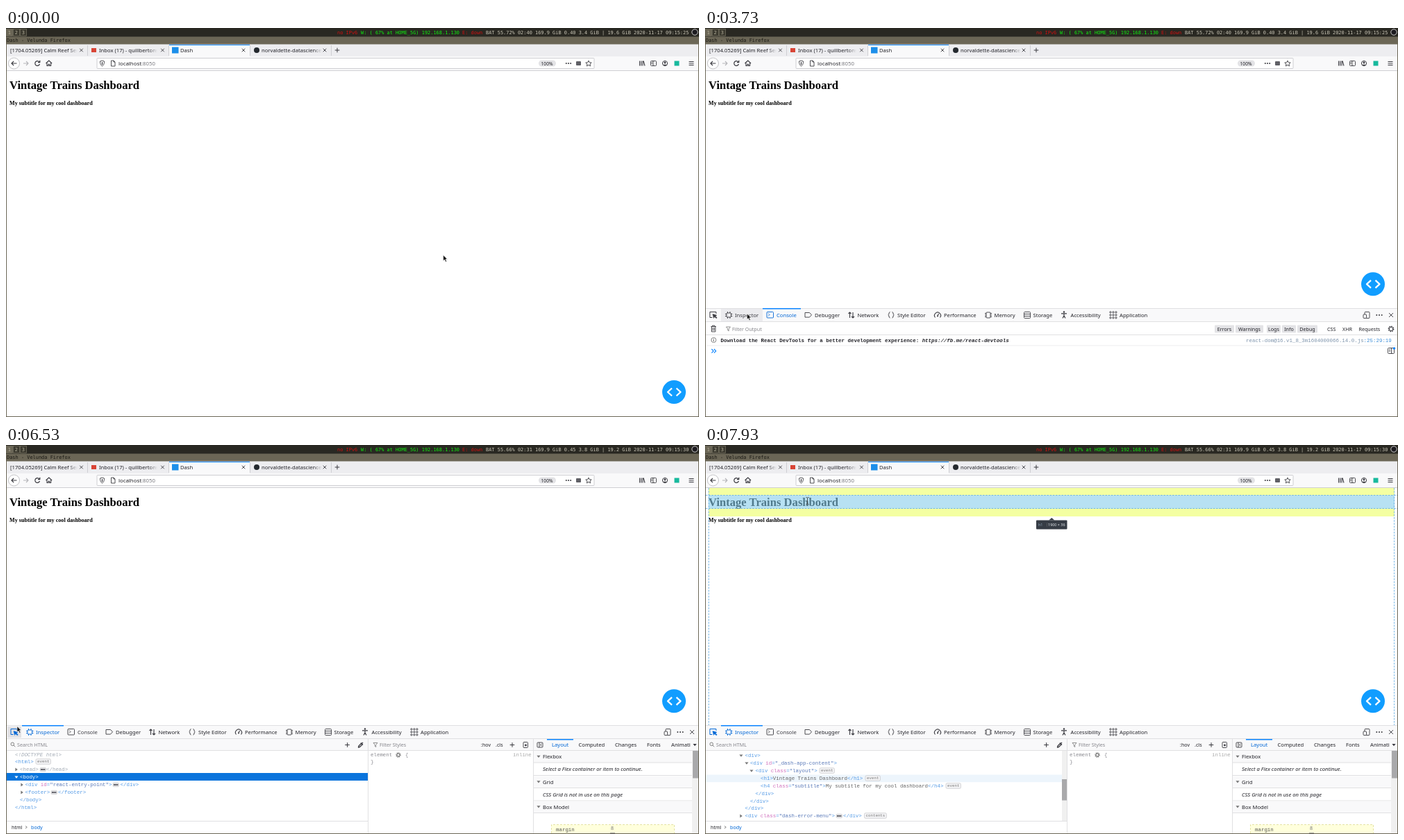
Write an HTML page that moves like this. It is 998 px wide and 561 px high and loops after 8 s.

```html
<!DOCTYPE html>
<html lang="en">
<head>
<meta charset="utf-8">
<title>Dashboard inspection</title>
<style>
html, body { margin: 0; width: 100%; height: 100%; overflow: hidden; background: #fff; }
svg { display: block; }
text { font: 7.65px "Noto Sans", sans-serif; fill: #222228; white-space: pre; }
text.bar { font: 6.95px "DejaVu Sans Mono", monospace; }
text.small { font-size: 7.15px; }
text.tiny { font-size: 5.4px; }
text.mono { font: 7.45px "Liberation Mono", monospace; }
text.badge { font: 5.8px "Liberation Mono", monospace; fill: #777; }
text.serif { font: bold 16.63px "Liberation Serif", serif; fill: #000; }
text.tag { fill: #559be6; }
text.dim { fill: #a3abb5; }
text.italic { font-style: italic; }
.name { fill: #d070bd; }
.val { fill: #5878b8; }
.txt { fill: #666; }
</style>
</head>
<body>
<svg id="stage" width="998" height="561" viewBox="0 0 998 561"></svg>
<script>
const LOOP = 8000, INK = '#3a3a40', BLUE = '#0a84ff', LINK = '#0067d6', EDGE = '#e0e0e2';
const OPEN = 1870, TOOLS = 2140, INSPECT = 4130, PANEL = 4270, TREE = 4530, PICK = 6130, OVER = 6730, HEAD = 7600;

const esc = s => s.replace(/&/g, '&amp;').replace(/</g, '&lt;').replace(/>/g, '&gt;');
const raw = (x, y, s, cls = '', more = '') => `<text x="${x}" y="${y}" class="${cls}" ${more}>${s}</text>`;
const text = (x, y, s, cls, more) => raw(x, y, esc(s), cls, more);
const color = c => `style="fill:${c}"`;
const rect = (x, y, w, h, fill, more = '') => `<rect x="${x}" y="${y}" width="${w}" height="${h}" fill="${fill}" ${more}/>`;
const path = (d, stroke = INK, w = .9, fill = 'none') =>
  `<path d="${d}" stroke="${stroke}" stroke-width="${w}" fill="${fill}" stroke-linejoin="round"/>`;
const circle = (x, y, r, fill = 'none', stroke = 'none', w = .9) =>
  `<circle cx="${x}" cy="${y}" r="${r}" fill="${fill}" stroke="${stroke}" stroke-width="${w}"/>`;
const box = (x, y, w, h, c = INK, fill = 'none') => rect(x, y, w, h, fill, `rx="1" stroke="${c}" stroke-width=".9"`);
const hline = (x, y, w, c = EDGE) => rect(x, y, w, 1, c);
const vline = (x, y, h, c = EDGE) => rect(x, y, 1, h, c);
const cross = (x, y, r = 2.3) => path(`M${x - r} ${y - r}l${2 * r} ${2 * r}m0 ${-2 * r}l${-2 * r} ${2 * r}`);
const plus = (x, y, r = 3.3) => path(`M${x - r} ${y}h${2 * r}M${x} ${y - r}v${2 * r}`, INK, 1);
const dots = (x, y, gap = 3.2) => [-1, 0, 1].map(i => circle(x + i * gap, y, 1, INK)).join('');
const gear = (x, y, r = 3.2, c = INK) => circle(x, y, r - .9, 'none', c, 1) +
  `<circle cx="${x}" cy="${y}" r="${r}" fill="none" stroke="${c}" stroke-width="1.4" stroke-dasharray="${r * .39}"/>`;
const funnel = (x, y) => path(`M${x - 3} ${y - 3}h6l-2.3 3v3l-1.4-1v-2z`, '#777', .8);
const lens = (x, y) => circle(x - .7, y - .7, 2.3, 'none', '#777') + path(`M${x + 1} ${y + 1}l2.3 2.3`, '#777');
const tri = (x, y, open, c = '#777') =>
  path(open ? `M${x - 2.6} ${y - 1.6}h5.2l-2.6 3.4z` : `M${x - 1.6} ${y - 2.6}v5.2l3.4-2.6z`, 'none', 0, c);

// Desktop bar and browser frame
const workspace = (n, fill) => rect(n * 10 - 9.5, 1.5, 9, 10, fill, 'stroke="#7a7564" stroke-width=".7"') +
  text(n * 10 - 7.2, 9, String(n), 'bar', color('#b5b09c'));

const status = (bat, left, load, mem, free, time) =>
  text(691, 9, `BAT ${bat}% ${left} 169.9 GiB ${load} ${mem} GiB | ${free} GiB 2020-11-17 ${time}`, 'bar', color('#c9c5b6'));

const tab = (x, label, width, icon = '') => icon +
  `<svg x="${x}" y="24" width="${width}" height="17">${text(0, 11, label)}</svg>` +
  rect(x + width - 12, 27, 12, 11, 'url(#fade)');

const frame =
  `<defs><linearGradient id="fade"><stop stop-color="#ededf0" stop-opacity="0"/><stop offset="1" stop-color="#ededf0"/></linearGradient></defs>` +
  rect(0, 0, 998, 561, '#6b6656') + rect(0, 0, 998, 12.5, '#292822') +
  workspace(1, '#6b6656') + workspace(2, '#3b392f') + workspace(3, '#3b392f') +
  text(477, 9, 'no IPv6', 'bar', color('#d01010')) +
  text(511, 9, 'W: ( 67% at HOME_5G) 192.168.1.130', 'bar', color('#10f010')) +
  text(657, 9, 'E: down', 'bar', color('#d01010')) +
  circle(992, 6, 4.2, '#1d1b20', '#ddd') +
  text(1, 20.3, 'Dash - Velunda Firefox', 'bar', color('#191813')) +
  rect(1, 23.5, 996, 18, '#ededf0') + rect(235, 24, 116, 17.5, '#f9f9fa') + rect(235, 24, 116, 1, BLUE) +
  [117, 234, 351, 468].map(x => vline(x, 25, 15, '#cfcfd3')).join('') +
  [108.5, 225.5, 342, 459].map(x => cross(x, 32)).join('') + plus(477, 32) +
  tab(6, '[1704.05269] Calm Reef Sera', 97) +
  tab(134, 'Inbox (17) - quillbertons', 84, rect(123, 29, 7, 6, '#d94436')) +
  rect(239, 27.5, 9.5, 9, '#1c8fea') + text(251, 35, 'Dash') +
  tab(368, 'norvaldette-datascience', 87, circle(361, 32, 4, '#24292e')) +
  rect(1, 41, 996, 20.5, '#f9f9fa') + hline(1, 61, 996, '#cfcfd3') +
  box(131, 43.5, 716, 15, '#c9c9cd', '#fff') +
  circle(11.5, 51, 8, '#fff', '#b4b4b8', .8) +
  path('M15.5 51h-7.5m3.2-3.2l-3.2 3.2 3.2 3.2', INK, 1.2) +
  path('M25 51h7m-3-3l3 3-3 3', '#b5b5b9', 1.1) +
  path('M48 49a3.4 3.4 0 1 0 .5 3M48.8 46.8v2.8h-2.8', INK, 1.2) +
  path('M57.5 51l4.3-4 4.3 4M59 50.5v4h2v-2.2h1.6v2.2h2v-4', INK, 1.1) +
  path('M135.5 48l3-1 3 1c0 4-1 5.5-3 7c-2-1.5-3-3-3-7z') + path('M138.5 49v4', INK, 1.2) +
  path('M151.5 47h3.5l2 2v6h-5.5zM155 47v2h2') +
  raw(162, 54, 'localhost<tspan fill="#77777d">:8050</tspan>', '', 'style="font-size:7.8px"') +
  rect(767, 46.5, 25, 9, '#e3e3e6', 'rx="4.5"') + text(770.5, 53.5, '100%', '', 'style="font-size:6.7px"') +
  dots(810, 51) + rect(821, 48, 7, 6, '#606066', 'rx="1"') +
  path('M839 47l1.2 2.7 3 .3-2.2 2 .6 2.9-2.6-1.5-2.6 1.5.6-2.9-2.2-2 3-.3z') +
  path('M912.5 47.5v7M914.7 47.5v7M917 47.5v7M918 47.5l2 7', INK, 1.1) +
  box(928.5, 47.5, 8, 7) + path('M932 47.5v7M929.5 49.5h1.5m-1.5 2h1.5') +
  circle(949, 51, 3.6, 'none', INK, 1) + circle(949, 50, 1.4, INK) + path('M947 53.3h4', INK, 1.2) +
  rect(962.5, 47.5, 7, 7, '#18b99d') +
  path('M983.5 48.5h7m-7 2.5h7m-7 2.5h7', INK, 1) +
  rect(1, 62, 996, 498, '#fff');

const page = text(5, 88, 'Vintage Trains Dashboard', 'serif') +
  text(5, 110.7, 'My subtitle for my cool dashboard', 'serif', 'style="font-size:8.15px"');

const codeButton = y => circle(962, y, 17, '#119dff') +
  path(`M959 ${y - 5.5}l-6 5.5 6 5.5M965.5 ${y - 5.5}l6 5.5-6 5.5`, '#fff', 2.3);

// Developer tools
const pickIcon = c => path('M16 412v-2.5h-9v8h3.5', c, 1) + path('M11 412.5l1.5 6 1.3-2 2.5 2.3 1-1-2.3-2.3 2-1.2z', c, .5, c);
const inspectIcon = c => box(31, 411, 6.5, 6, c) +
  path('M32.5 411v-2m3.5 2v-2m-3.5 8v2m3.5-2v2M31 412.5h-2m2 3h-2m8.5-3h2m-2 3h2', c);
const consoleIcon = c => box(89, 409.5, 9.5, 8.5, c) + path('M91 411.5l2 2-2 2', c);
const inspectorTab = c => inspectIcon(c) + text(43, 416.5, 'Inspector', '', color(c));
const consoleTab = c => consoleIcon(c) + text(103, 416.5, 'Console', '', color(c));
const tabLine = (x, w) => rect(x, 404, w, 1.5, BLUE);

const toolLabels = { 158: 'Debugger', 219.5: 'Network', 277: 'Style Editor', 344: 'Performance',
  416.5: 'Memory', 472.5: 'Storage', 526.5: 'Accessibility', 597: 'Application' };
const toolbar = rect(1, 404, 996, 19.5, '#f9f9fa') + hline(1, 404, 996) + hline(1, 423, 996) +
  Object.entries(toolLabels).map(([x, s]) => text(x, 416.5, s)).join('') +
  path('M144 410.5h6.5l3 3.3-3 3.3h-6.5z') +
  path('M208.5 418v-8m-2 2l2-2 2 2M213 410v8m-2-2l2 2 2-2', INK, 1.1) +
  path('M266.5 409.5c-2 0-1 4-2.7 4.3c1.7.3.7 4.3 2.7 4.3M269.5 409.5c2 0 1 4 2.7 4.3c-1.7.3-.7 4.3-2.7 4.3', INK, 1) +
  path('M331.5 417.5a4.5 4.5 0 1 1 7 0M335 415l1.5-3', INK, 1.1) + circle(335, 415.5, 1, INK) +
  box(405, 410, 6, 8) + path('M403 411.5h2m-2 2.5h2m-2 2.5h2m6-5h2m-2 2.5h2m-2 2.5h2') +
  box(459.5, 409.5, 9, 9) + path('M459.5 412.5h9m-9 3h9') +
  circle(517, 409.5, 1.2, INK) + path('M513 411.8h8M517 412v3l-2 3.5M517 415l2 3.5', INK, 1.2) +
  [584, 588, 592].map(x => [410, 414, 418].map(y => box(x - 1.2, y - 1.2, 2.2, 2.2)).join('')).join('') +
  box(950, 409.5, 7, 9) + box(948, 413, 4.5, 5.5, INK, '#f9f9fa') + dots(971, 414, 3.7) + cross(988, 414, 3);

const filterButtons = [[734, 28, 'Errors'], [764, 40, 'Warnings'], [809, 20, 'Logs'], [831, 20, 'Info'], [853, 29, 'Debug']];
const consolePanel =
  path('M8.5 430.5h7.5M10.5 430.5v-1.3h3.5v1.3M9.5 430.5v7.5h5.5v-7.5M11.3 432v4.5m2-4.5v4.5') +
  funnel(33.5, 434) + text(39, 436.5, 'Filter Output', 'small', color('#85858b')) +
  filterButtons.map(([x, w, s]) => rect(x, 428.5, w, 11, '#e3e3e6', 'rx="1"') +
    text(x + w / 2, 436.5, s, 'small', 'text-anchor="middle"')).join('') +
  text(896, 436.5, 'CSS', 'small') + text(918, 436.5, 'XHR', 'small') + text(941.5, 436.5, 'Requests', 'small') +
  gear(988, 434, 3.7) + hline(1, 442, 996) + hline(1, 457.5, 996, '#ededf0') +
  circle(12.5, 450, 3.5, 'none', '#666', .8) + path('M12.5 449.5v2.5m0-4.2v1', '#555') +
  raw(22.5, 452.5, 'Download the React DevTools for a better development experience: <tspan font-style="italic">https://fb.me/react-devtools</tspan>',
    'mono', 'style="font-weight:bold"') +
  raw(779, 452.5, 'react-dom@16.v1_8_3m1604000066.14.0.js<tspan fill="#3f8fd8">:25:29:19</tspan>', 'mono', color('#7d93ab')) +
  path('M9.5 463l2.8 2.8-2.8 2.8M13 463l2.8 2.8-2.8 2.8', BLUE, 1.2) +
  box(983.5, 461.5, 9, 8) + path('M988.5 461.5v8M985 464h2m-2 2h2') + circle(992.5, 462, 1.7, BLUE);

const section = (y, title, note) => rect(760, y, 228, 17, '#f9f9fa') + hline(760, y + 16.5, 228) +
  tri(767, y + 8.3, true) + text(773, y + 11, title) +
  (note ? text(773, y + 29, note, 'italic') + hline(760, y + 35, 228) : '');

const inspectorPanel = rect(1, 424, 996, 136, '#fff') + rect(1, 424, 996, 17, '#f9f9fa') + hline(1, 440, 996) +
  lens(10, 432) + text(16, 435, 'Search HTML', 'small', color('#85858b')) + plus(491.5, 432.5) +
  path('M507.5 436l.5-2 3.5-3.5 1.5 1.5-3.5 3.5zM511 429.5l3 3M512 431l2-2', INK, 1.3) +
  vline(521, 424, 136) + hline(1, 542, 520) +
  funnel(532, 432.5) + text(538, 435, 'Filter Styles', 'small', color('#85858b')) +
  text(684, 435, ':hov', 'small') + text(705, 435, '.cls', 'small') + plus(729, 432.5) +
  box(745, 428.5, 6.5, 8) + circle(748.5, 433, 1.4, INK) + vline(759, 424, 136) +
  box(765, 429, 8, 7) + path('M768 429v7M771.5 431l-2 1.5 2 1.5') +
  rect(779, 424, 38, 1.5, BLUE) + text(786, 435, 'Layout', '', color(LINK)) +
  text(824.5, 435, 'Computed') + text(877, 435, 'Changes') + text(923, 435, 'Fonts') + text(958, 435, 'Animati') +
  tri(992, 432.5, true, INK) +
  section(441, 'Flexbox', 'Select a Flex container or item to continue.') +
  section(477.5, 'Grid', 'CSS Grid is not in use on this page') + section(513.5, 'Box Model') +
  rect(785.5, 547.5, 177, 12.5, '#ffffdc') +
  '<path d="M785.5 560v-12.5h177v12.5" fill="none" stroke="#e4e2a4" stroke-dasharray="3 2"/>' +
  text(792, 556.5, 'margin', 'mono', color('#555')) + rect(870, 559, 7, 1, '#999') +
  rect(988, 441, 9, 119, '#f0f0f0') + rect(989, 441, 8, 39.5, '#a9a9ab');

const badge = (x, y, s) => rect(x, y - 4.2, s.length * 3.48 + 4, 7.5, '#f4f4f6', 'rx="1.5" stroke="#c4c4c8" stroke-width=".7"') +
  text(x + 2, y + 1.3, s, 'badge');
const more = (x, y) => rect(x, y - 2.7, 8.5, 5.4, '#e4e4e8', 'rx="1.5" stroke="#bbb" stroke-width=".5"') + dots(x + 4.2, y, 2.2);
const tag = (x, y, s, cls = '') => raw(x, y + 2.3,
  esc(s).replace(/(\w+)=("[^"]*")/g, (_, n, v) => `<tspan class='name'>${n}</tspan>=<tspan class='val'>${v}</tspan>`)
    .replace(/&gt;([^&]+)&lt;/, "&gt;<tspan class='txt'>$1</tspan>&lt;"), 'mono tag ' + cls);

const GRAY = color('#8a8a90');
const rules = text(525, 448.7, 'element', 'mono', GRAY) + gear(565, 447, 3, '#666') +
  text(575, 448.7, '{', 'mono', GRAY) + text(525, 459, '}', 'mono', GRAY) +
  text(730, 448.7, 'inline', 'mono', color('#aaa')) + text(873, 554.5, '8', 'small', 'text-anchor="middle" style="fill:#777"') +
  text(8, 553.7, 'html', 'small') + path('M28 549.5l2.3 1.7-2.3 1.7', '#666', .8) +
  text(36, 553.7, 'body', 'small', color(LINK));

const hoverRows = rect(1, 451.5, 520, 11, '#edf5fc') + rect(1, 517, 520, 10.5, '#edf5fc');
const shortTree = rect(1, 473, 520, 11, '#0a74dc') +
  text(13, 448.7, '<!DOCTYPE html>', 'mono dim italic') +
  tag(13, 457, '<html>') + badge(43, 457, 'event') +
  tri(15, 468, false) + tag(20, 468, '<head>', 'dim') + more(49, 468) + tag(58, 468, '</head>', 'dim') +
  tri(15, 479, true, '#fff') + text(20, 481.2, '<body>', 'mono', color('#fff')) +
  tri(23, 490, false) + tag(27.5, 490, '<div id="react-entry-point">') + more(154, 490) + tag(164.5, 490, '</div>') +
  tri(23, 501, false) + tag(27.5, 501, '<footer>') + more(65, 501) + tag(75, 501, '</footer>') +
  tag(20, 511.7, '</body>') + tag(13, 522.3, '</html>');

const deepTree = rect(1, 475.5, 513, 10.7, '#edf5fc') +
  tri(52, 448, true) + tag(57.5, 448, '<div>') +
  tri(60, 459, true) + tag(65, 459, '<div id="_dash-app-content">') +
  tri(67, 470, true) + tag(72.5, 470, '<div class="layout">') + badge(165, 470, 'event') +
  tag(80, 481, '<h1>Vintage Trains Dashboard</h1>') + badge(231, 481, 'event') +
  tag(80, 492, '<h4 class="subtitle">My subtitle for my cool dashboard</h4>') + badge(347, 492, 'event') +
  tag(72.5, 502.5, '</div>') + tag(65, 513.5, '</div>') + tag(57.5, 524, '</div>') +
  tri(52, 535, false) + tag(57.5, 535, '<div class="dash-error-menu">') + more(189, 535) +
  tag(199, 535, '</div>') + badge(229.5, 535, 'contents') +
  rect(514, 441, 7, 101, '#f0f0f0') + rect(514, 482, 7, 30.5, '#a9a9ab');

// Page highlighter
const veil = (x, y, w, h, c = '#87ceeb') => rect(x, y, w, h, c, 'opacity=".6"');
const guides = d => `<path d="${d}" fill="none" stroke="#5aa9e4" stroke-width=".8" stroke-dasharray="2.6 1.6"/>`;
const tip = (x, y, w, name, size) => rect(x, y, w, 13, '#363c45', 'rx="1"') +
  path(`M${x + w / 2 - 4} ${y}l4-3.5 4 3.5z`, 'none', 0, '#363c45') +
  text(x + 3, y + 8.5, name, 'tiny', color('#8fa7b8')) + rect(x + w - size.length * 2.85 - 3.5, y + 4, .5, 5, '#777') +
  text(x + w - 3, y + 8.5, size, 'tiny', 'text-anchor="end" style="fill:#e4e8ec"');
const rootBox = veil(1, 62, 996, 61.5) + guides('M1 123.5h996M1 62h996M1.5 62v342M996.5 62v342') +
  tip(471, 129.5, 56, 'html', '1916 × 119.15');
const headBox = veil(5, 62, 988, 10.5, '#edff64') + veil(5, 91.5, 988, 11.5, '#edff64') + veil(5, 72.5, 988, 19) +
  guides('M1 72.5h996M1 91.5h996M5.5 62v342M992.5 62v342') + tip(477, 108.6, 44.5, 'h1', '1900 × 36');

// Each layer is shown from its first time up to its second
const layers = [
  [0, LOOP, frame + page],
  [0, INSPECT, status('55.72', '02:40', '0.40', '3.4', '19.6', '09:15:25')],
  [INSPECT, LOOP, status('55.66', '02:31', '0.45', '3.8', '19.2', '09:15:30')],
  [OVER, HEAD, rootBox], [HEAD, LOOP, headBox],
  [0, OPEN, codeButton(525)], [OPEN, LOOP, codeButton(369.3)],
  [OPEN, TOOLS, hline(5, 403.5, 988)],
  [TOOLS, LOOP, toolbar],
  [3400, 5400, rect(23, 405, 60, 18, '#ebebee')],
  [5500, OVER, rect(2, 406, 20, 16, '#e2e2e5')],
  [TOOLS, PICK, pickIcon(INK)], [PICK, LOOP, pickIcon(LINK)],
  [TOOLS, INSPECT, inspectorTab(INK) + consoleTab(LINK) + tabLine(83, 55)],
  [INSPECT, LOOP, inspectorTab(LINK) + consoleTab(INK) + tabLine(23, 60)],
  [TOOLS, PANEL, consolePanel],
  [PANEL, LOOP, inspectorPanel],
  [PANEL, TREE, rect(871.5, 552.5, 3, .8, '#666')],
  [TREE, LOOP, rules],
  [OVER, HEAD, hoverRows], [TREE, HEAD, shortTree], [HEAD, LOOP, deepTree]
];
const stage = document.getElementById('stage');
stage.innerHTML = layers.map(l => `<g>${l[2]}</g>`).join('') +
  `<g>${path('M0 0v8.3l1.9-1.8 1.5 3.3 1.5-.7-1.5-3.2h2.5z', '#fff', .6, '#111')}</g>` +
  `<g>${path('M-2-5q2 0 2 1q0-1 2-1M0-4v8M-2 5q2 0 2-1q0 1 2 1', '#444')}</g>`;
const groups = [...stage.children];
const pointer = groups.at(-2), beam = groups.at(-1);

const route = [[0, 629.7, 327.5], [2270, 629.7, 327.5], [2870, 122.7, 362.7], [3000, 122.7, 362.7],
  [3400, 60.5, 412], [5200, 60.5, 412], [5700, 16, 405.7], [6560, 16, 405.7],
  [7400, 138.7, 106.5], [7480, 138.7, 106.5], [7660, 147.5, 80.5], [LOOP, 147.5, 80.5]];

function cursorAt(t) {
  const i = route.findIndex(k => k[0] > t);
  const [t0, x0, y0] = route[i - 1], [t1, x1, y1] = route[i];
  const u = (t - t0) / (t1 - t0), e = u * u * (3 - 2 * u);
  return [x0 + (x1 - x0) * e, y0 + (y1 - y0) * e];
}

const show = (el, on) => el.style.display = on ? '' : 'none';
function draw() {
  const t = performance.now() % LOOP;
  layers.forEach(([from, to], i) => show(groups[i], t >= from && t < to));
  const [x, y] = cursorAt(t);
  for (const g of [pointer, beam]) g.setAttribute('transform', `translate(${x} ${y})`);
  show(pointer, t < HEAD);
  show(beam, t >= HEAD);
  requestAnimationFrame(draw);
}
draw();
</script>
</body>
</html>
```
